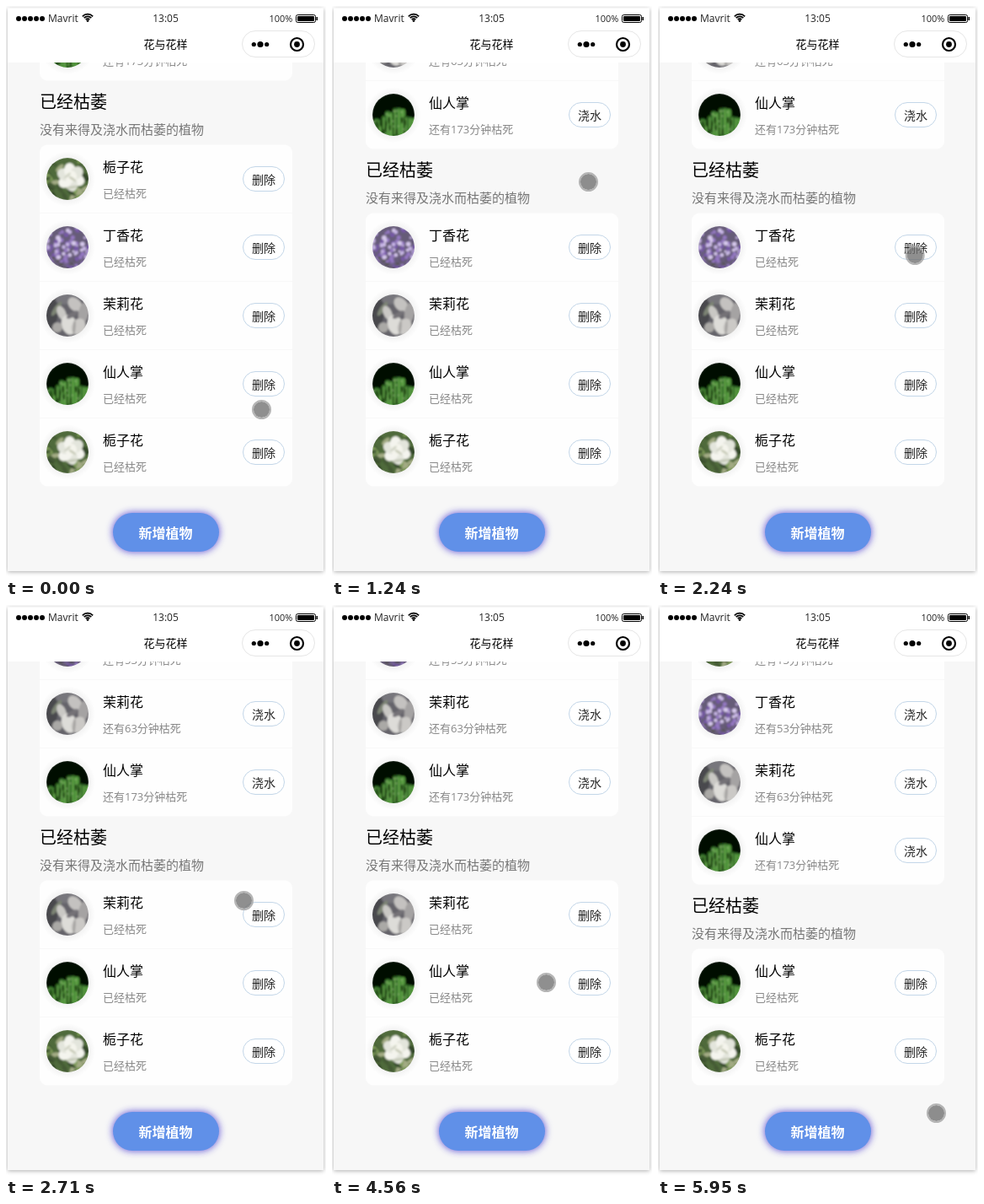
An HTML page for the animation above (6030 ms loop, 380x677 px).

```html
<!DOCTYPE html>
<html lang="zh-CN">
<head>
<meta charset="utf-8">
<style>
  html, body { margin: 0; width: 100%; height: 100%; overflow: hidden; background: #fff; }
  svg { display: block; width: 380px; height: 677px; }
  text { font-family: "Open Sans", "Noto Sans CJK SC", "Noto Sans CJK", sans-serif; }
  #phone { filter: drop-shadow(0 1px 2.5px rgba(0,0,0,.32)); }
  #add rect { filter: drop-shadow(0 0 4px #8a80dc) drop-shadow(0 0 2px #b9b3ea); }
</style>
</head>
<body>
<svg viewBox="0 0 380 677" xmlns="http://www.w3.org/2000/svg">
  <defs>
    <clipPath id="round"><circle r="25"/></clipPath>
    <clipPath id="page"><rect x="2" y="67" width="375" height="603"/></clipPath>
    <radialGradient id="halo"><stop offset=".78" stop-opacity=".04"/><stop offset="1" stop-opacity="0"/></radialGradient>
    <filter id="soft"><feGaussianBlur stdDeviation=".8"/></filter>
  </defs>
  <rect id="phone" x="2" y="2.5" width="375" height="667.5" fill="#f7f7f7"/>
  <g clip-path="url(#page)">
    <g id="upper"></g>
    <g id="lower"></g>
  </g>
  <g id="header"><rect x="2" y="2.5" width="375" height="64.5" fill="#fff"/></g>
  <g id="add"><rect x="127" y="601" width="126" height="46" rx="23" fill="#6090e8"/></g>
  <g id="touch">
    <circle r="9.6" fill="#707070" fill-opacity=".78"/>
    <circle r="10.5" fill="none" stroke="#a2a2a2" stroke-opacity=".8" stroke-width="2"/>
  </g>
</svg>
<script>
const LOOP = 6030, ROW = 81;
const $ = id => document.getElementById(id);

function el(parent, tag, attrs) {
  const node = document.createElementNS('http://www.w3.org/2000/svg', tag);
  for (const k in attrs) node.setAttribute(k, attrs[k]);
  return parent.appendChild(node);
}
const circle = (g, cx, cy, r, fill, more) => el(g, 'circle', { cx, cy, r, fill, ...more });
const ellipse = (g, cx, cy, rx, ry, turn, fill) =>
  el(g, 'ellipse', { rx, ry, fill, transform: `translate(${cx} ${cy}) rotate(${turn})` });

// Text placed by the vertical middle of its glyphs
function label(g, str, x, mid, size, fill, more) {
  const t = el(g, 'text', { x, y: mid + size * .38, 'font-size': size, fill, ...more });
  t.textContent = str;
  return t;
}
const middle = { 'text-anchor': 'middle' };

function seeded(s) {
  return () => (s = s * 16807 % 2147483647) / 2147483647;
}

const plants = {
  '栀子花'(g) {
    const rnd = seeded(41);
    circle(g, 0, 0, 26, '#4f6a3a');
    for (let i = 0; i < 40; i++) {
      ellipse(g, rnd() * 52 - 26, rnd() * 52 - 26, 6, 2.5, rnd() * 180,
        ['#34482a', '#7d9a58', '#a3ab84', '#445a34'][i % 4]);
    }
    for (let i = 0; i < 6; i++) {
      const a = i * Math.PI / 3 + .4;
      ellipse(g, 4 + 8 * Math.cos(a), -2 + 8 * Math.sin(a), 9, 7, i * 60 + 20, i % 2 ? '#e3e5dc' : '#f4f4ee');
    }
    circle(g, 4, -3, 7, '#f4f4ec');
    ellipse(g, 6, 0, 5, 1.5, 35, '#c9ccba');
    ellipse(g, 0, -4, 5, 1.5, -40, '#d3d6c8');
    ellipse(g, 5, 10, 7, 1.5, -10, '#c5c9b8');
  },
  '丁香花'(g) {
    const rnd = seeded(77);
    circle(g, 0, 0, 26, '#665c78');
    for (let i = 0; i < 130; i++) {
      const y = rnd() * 52 - 26;
      circle(g, rnd() * 52 - 26, y, 1.2 + rnd() * 1.7,
        y > 12 && i % 2 ? '#55534f' : ['#9579c2', '#c8b6e6', '#7659a6', '#d6c8ec'][i % 4]);
    }
  },
  '茉莉花'(g) {
    circle(g, 0, 0, 26, '#65646a');
    ellipse(g, -19, -2, 8, 18, 10, '#48484e');
    ellipse(g, 0, -20, 14, 6, -10, '#77767c');
    ellipse(g, -13, -8, 3, 10, 35, '#7d8474');
    ellipse(g, 9, -13, 10, 7, 45, '#c4c2c0');
    ellipse(g, 19, -3, 6, 13, 10, '#a5a3a3');
    ellipse(g, -7, -3, 5, 9, -25, '#c9c8c4');
    ellipse(g, 2, 11, 9, 12, -20, '#dddcd8');
    ellipse(g, 13, 13, 8, 10, 30, '#cbc9c6');
    ellipse(g, -12, 14, 6, 6, 0, '#aaa9a6');
    ellipse(g, 6, -1, 8, 3, -30, '#747277');
    ellipse(g, 8, 14, 1.5, 9, 5, '#a3a19f');
  },
  '仙人掌'(g) {
    const rnd = seeded(19);
    circle(g, 0, 0, 26, '#050805');
    for (let i = 0; i < 11; i++) {
      const x = i * 4.4 - 20, top = -13 + Math.abs(x - 3) * .75 + i * 5 % 7;
      el(g, 'rect', { x: x - 3.5, y: top, width: 7, height: 40, rx: 3.5, fill: ['#356f2a', '#4b8f38', '#28581f'][i % 3] });
      el(g, 'rect', { x: x - 1, y: top + 2, width: 1.6, height: 30, rx: .8, fill: '#67a84c' });
      for (let y = top + 4; y < 25; y += 6) circle(g, x - 3 + rnd() * 6, y, .8, '#a3c488');
    }
    for (let i = 0; i < 14; i++) ellipse(g, rnd() * 44 - 22, 6 + rnd() * 18, 1.2, 4, 0, '#17380f');
  }
};

function card(g, top, bottom) {
  return el(g, 'rect', { x: 40, y: top, width: 300, height: bottom - top, rx: 9, fill: '#fefefe' });
}

// One list row around its middle line; returns the button's parts
function row(parent, c, name, note, action) {
  const g = el(parent, 'g', { transform: `translate(0 ${c})` });
  circle(g, 73, 0, 33, 'url(#halo)');
  const pic = el(el(g, 'g', { transform: 'translate(73 0)', 'clip-path': 'url(#round)' }), 'g', { filter: 'url(#soft)' });
  plants[name](pic);
  label(g, name, 115, -14, 16, '#000');
  label(g, note, 115, 17, 13, '#888');
  const box = el(g, 'rect', { x: 281.5, y: -14.5, width: 49, height: 29, rx: 14.5, fill: '#fff', stroke: '#c3d6e8' });
  const text = label(g, action, 306, .5, 14, '#222', middle);
  return { g, box, text };
}
const rule = (g, y) => el(g, 'path', { d: `M40 ${y}H340`, stroke: '#f8f8f8' });

// Living plants and the section heading, moving down together
const upper = $('upper');
card(upper, -236, 88.5);
[['栀子花', 13], ['丁香花', 53], ['茉莉花', 63], ['仙人掌', 173]].forEach(([name, left], i) => {
  const c = 48 + ROW * (i - 3);
  row(upper, c, name, `还有${left}分钟枯死`, '浇水');
  if (i < 3) rule(upper, c + 40.5);
});
label(upper, '已经枯萎', 40, 113, 20, '#000', { 'font-weight': 300 });
label(upper, '没有来得及浇水而枯萎的植物', 40, 146, 15, '#777', { 'font-weight': 500 });

// Withered plants, fixed to the bottom
const lower = $('lower');
const deadCard = card(lower, 164.5, 569.5);
const dead = ['栀子花', '丁香花', '茉莉花', '仙人掌', '栀子花'].map((name, i) => {
  const r = row(lower, 205 + ROW * i, name, '已经枯死', '删除');
  if (i < 4) rule(r.g, 40.5);
  return r;
});

// Status and title bars
const head = $('header');
for (let i = 0; i < 5; i++) circle(head, 15 + 7 * i, 15, 3, '#000');
label(head, 'Mavrit', 50, 14, 12, '#222');
for (const r of [3.2, 6, 8.6]) {
  const d = r * .72;
  el(head, 'path', { d: `M${97 - d} ${18.5 - d}A${r} ${r} 0 0 1 ${97 + d} ${18.5 - d}`, fill: 'none', stroke: '#000', 'stroke-width': 1.7 });
}
circle(head, 97, 17.6, 1.4, '#000');
label(head, '13:05', 189.5, 14, 12, '#222', middle);
label(head, '100%', 312.5, 15, 11, '#222');
el(head, 'rect', { x: 344.5, y: 10.5, width: 23, height: 9, rx: 2, fill: '#fff', stroke: '#000' });
el(head, 'rect', { x: 346, y: 12, width: 20, height: 6, rx: 1, fill: '#000' });
el(head, 'rect', { x: 368.5, y: 13, width: 1.5, height: 4, fill: '#000' });
label(head, '花与花样', 189.5, 45, 13, '#000', middle);
el(head, 'rect', { x: 280.5, y: 29.5, width: 86, height: 31, rx: 15.5, fill: '#fff', stroke: '#e6e6e6' });
circle(head, 294.3, 45.5, 2.6, '#000');
circle(head, 302, 45.5, 3.6, '#000');
circle(head, 309.7, 45.5, 2.6, '#000');
circle(head, 345.5, 45.5, 7.5, 'none', { stroke: '#000', 'stroke-width': 2.2 });
circle(head, 345.5, 45.5, 3.4, '#000');

label($('add'), '新增植物', 189.5, 625, 16, '#fff', { ...middle, 'font-weight': 700 });

const presses = [[690, 920], [1860, 2090], [3240, 3470]];
const removals = [1240, 2400, 4790];
// Pointer path: time, x, y
const path = [
  [0, 303.5, 478.5], [60, 303.5, 478.5], [250, 292, 345], [460, 304.5, 223.5], [610, 304.5, 208.5],
  [1240, 304.5, 208.5], [1390, 304.5, 216.5], [1540, 304.5, 216.5], [1560, 305.5, 257.5],
  [1790, 305.5, 290], [1940, 305.5, 294.5], [2230, 305.5, 294.5], [2480, 299, 318], [2710, 282.5, 350.5],
  [2850, 282.5, 350.5], [3090, 290, 371], [3400, 291.5, 373.5], [3460, 291.5, 373.5], [3470, 291.5, 387.5],
  [3780, 251.5, 440.5], [4170, 252, 441], [4410, 254, 446], [4560, 254.5, 447.5], [5030, 256, 449.5],
  [5340, 257.5, 450.5], [5480, 257.5, 450.5], [5650, 299.5, 453.5], [5870, 299.5, 453.5],
  [5950, 330.5, 602.5], [LOOP, 330.5, 602.5]
];

function pointAt(t) {
  const i = path.findIndex(p => p[0] > t);
  const [t0, x0, y0] = path[i - 1], [t1, x1, y1] = path[i];
  const k = (t - t0) / (t1 - t0);
  return [x0 + (x1 - x0) * k, y0 + (y1 - y0) * k];
}

function draw(t) {
  const gone = removals.filter(at => t >= at).length;
  upper.setAttribute('transform', `translate(0 ${ROW * gone})`);
  deadCard.setAttribute('y', 164.5 + ROW * gone);
  deadCard.setAttribute('height', 405 - ROW * gone);
  dead.forEach((r, i) => {
    const press = presses[i];
    const down = press && t >= press[0] && t < press[1];
    r.g.setAttribute('display', i < gone ? 'none' : 'inline');
    r.box.setAttribute('fill', down ? '#dedede' : '#fff');
    r.text.setAttribute('fill', down ? '#666' : '#222');
  });
  $('touch').setAttribute('transform', `translate(${pointAt(t)})`);
}

const start = performance.now();
function tick() {
  draw((performance.now() - start) % LOOP);
  requestAnimationFrame(tick);
}
draw(0);
requestAnimationFrame(tick);
</script>
</body>
</html>
```
